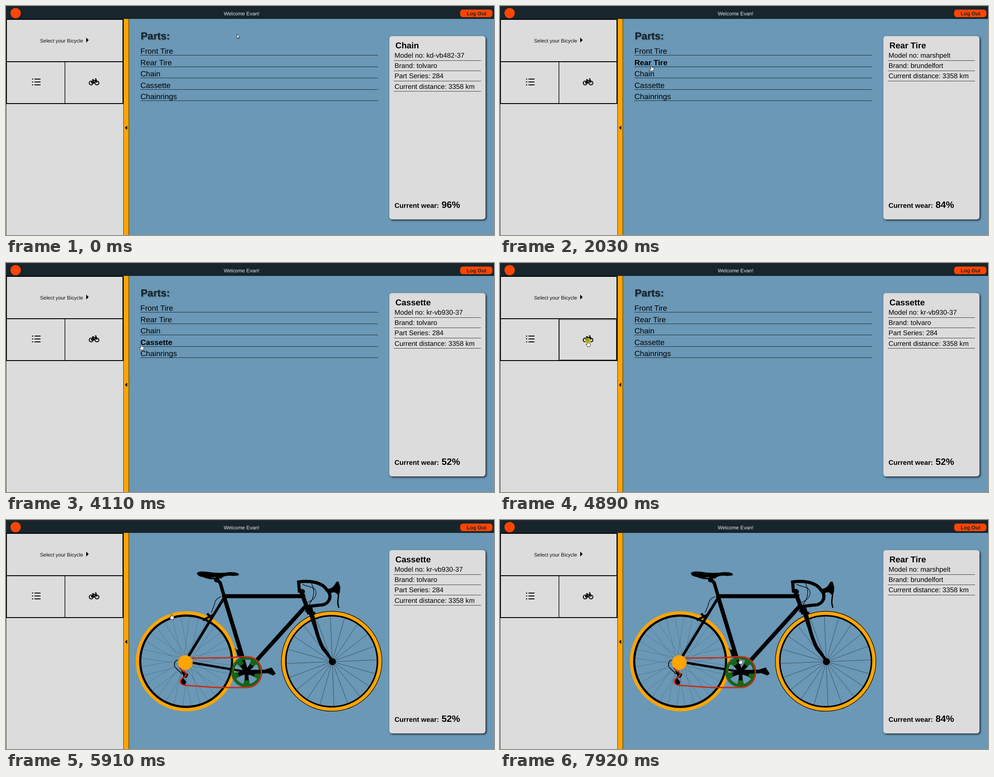
An HTML page for the animation above (8000 ms loop, 1089 by 514 pixels).

```html
<!DOCTYPE html>
<html lang="en">
<head>
<meta charset="utf-8">
<title>Bicycle parts</title>
<style>
  html, body { margin: 0; width: 100%; height: 100%; overflow: hidden; background: #6a98b6; }
  svg { display: block; width: 1089px; height: 514px; font-family: "Liberation Sans", Arial, sans-serif; text-rendering: geometricPrecision; }
  .b { font-weight: bold; }
  .line { fill: none; stroke: #000; }
  .thin { fill: none; stroke: #000; stroke-opacity: .7; }
  .shade { filter: drop-shadow(1px 1px 1px #0007); }
  .card { filter: drop-shadow(2px 2px 2px #000c); }
</style>
</head>
<body>
<svg viewBox="0 0 1089 514">
  <rect width="1089" height="514" fill="#6a98b6"/>

  <g id="list">
    <text class="b shade" x="300.5" y="74.5" font-size="23" fill="#17242c">Parts:</text>
    <g id="rows" font-size="17.07"></g>
  </g>

  <g id="bike">
    <g id="spokes" class="line"></g>
    <g class="line">
      <circle cx="402" cy="317" r="102.8" stroke-width="5.5"/>
      <circle cx="402" cy="317" r="108.6" stroke="#ffa500" stroke-width="7.4"/>
      <circle cx="726.7" cy="317" r="102.4" stroke-width="3.6"/>
      <circle cx="726.7" cy="317" r="108" stroke-width="9.6"/>
      <circle cx="726.7" cy="317" r="107.8" stroke="#ffa500" stroke-width="7.6"/>
    </g>
    <!-- frame -->
    <g class="line">
      <path stroke-width="9" d="M484 171H668M670 192L545 331"/>
      <path stroke-width="9" d="M486 170L527 305"/>
      <path stroke-width="7.5" d="M470 133L478 141L487 172M527 305L537 341"/>
      <path stroke-width="6" d="M487 174L407 306"/>
      <path stroke-width="5" d="M414 320L537 341"/>
      <path stroke-width="9" d="M657 156L677 211"/>
      <path stroke-width="7" d="M655 163L653 139Q672 136 690 140Q709 145 716 157C730 169 722 192 699 191L675 194"/>
      <path stroke-width="3" d="M741 152C746 170 736 180 743 197M441 127Q458 134 473 130Q488 121 507 124"/>
      <path stroke-width="1.2" d="M661 144C676 152 692 148 692 165C690 179 680 180 672 186M681 141C690 158 688 176 676 190M480 172Q467 176 465 190L458 208M434 326L408 319M510 289L521 296"/>
      <path stroke-width="1.6" d="M386 314C374 315 373 329 381 334L393 346"/>
      <path stroke-width="5" d="M439 225L464 212M449 210L459 221M668 204L690 209M676 200L684 214"/>
    </g>
    <path d="M426 119Q430 114 447 116Q475 121 499 117Q520 117 520 123Q518 126 503 125Q488 123 479 132L468 128Q453 131 439 128Q426 126 426 119Z"/>
    <path d="M711 152C723 158 731 151 737 139L742 138L746 151L745 163L740 168Q733 157 721 167Z"/>
    <path d="M670 193L682 190L694 238Q700 264 709 282L731 315L727 319L704 290Q694 270 688 247Z"/>
    <path d="M513 292L526 289L532 309H518Z"/>
    <circle cx="470" cy="134" r="6"/>
    <circle cx="661" cy="161" r="6"/>
    <circle cx="728.5" cy="318" r="7.8"/>
    <path d="M390 338L407 346L404 353L396 355L402 363L400 370L391 368L390 358L396 350Z"/>
    <!-- drivetrain -->
    <circle cx="400" cy="320" r="15.5" fill="#ffa500"/>
    <circle cx="400" cy="320" r="16" fill="none" stroke="#ffa500" stroke-width="2.5" stroke-dasharray="2 1.6"/>
    <g transform="translate(537 341)">
      <circle r="30.5" fill="none" stroke="#15641c" stroke-width="5.5"/>
      <circle r="34" fill="none" stroke="#12451a" stroke-width="2.5" stroke-dasharray="2 1.5"/>
      <g id="spider"></g>
      <circle r="8"/>
      <path d="M0 -4.5L40 -5L56 -10L65 4L59 8L47 3L0 4.5Z"/>
    </g>
    <path fill="none" stroke="#cb2c12" stroke-width="3" d="M414 310L500 309Q528 306 540 307C559 308 570 323 570 342C570 363 555 377 535 376L470 376L399 371C386 369 387 359 395 354C405 349 404 342 394 338L387 332"/>
  </g>

  <!-- header -->
  <rect width="1089" height="29" fill="#18252d"/>
  <rect width="1089" height="1.5" fill="#2b2b2b"/>
  <circle cx="21.5" cy="16" r="11.5" fill="#ff4500"/>
  <text x="486" y="20.5" font-size="11.38" fill="#e3e6e8">Welcome Evan!</text>
  <rect x="1013.5" y="8" width="72" height="17" rx="6" fill="#ff4500"/>
  <text class="b" x="1028" y="20.5" font-size="11.5" fill="#18252d">Log Out</text>

  <!-- sidebar -->
  <rect y="29" width="262" height="485" fill="#dcdcdc"/>
  <rect x="262" y="29" width="12" height="485" fill="#ffa500"/>
  <path class="thin" d="M.5 29V514M262.3 29V514M274 29V514"/>
  <path class="line" stroke-width="2" d="M1 30H261V219H1ZM1 125H261"/>
  <path class="line" stroke-width="1.4" d="M131.5 126V218"/>
  <text x="76" y="81.7" font-size="11.38" fill="#111">Select your Bicycle</text>
  <path d="M179 71L184.5 76.5L179 82Z"/>
  <path class="line" stroke-width="2" d="M63.5 164H77M63.5 170.5H77M63.5 177H77M58 164h2.6M58 170.5h2.6M58 177h2.6"/>
  <g class="line" stroke-width="2">
    <circle cx="190" cy="172.8" r="4.3"/>
    <circle cx="203" cy="172.8" r="4.3"/>
    <path d="M190 172.8L194.5 167H200.5L197 172.8H190M194.5 167L197 172.8M192 165.5h4M198.5 163.5h2.2L203 172.8"/>
  </g>
  <rect id="ring" x="132.5" y="127" width="127" height="90.5" fill="none" stroke="#444"/>
  <path d="M270.5 268.5V278L265.5 273.2Z"/>

  <rect class="card" x="855.5" y="67.5" width="214.5" height="411.5" rx="6" fill="#dcdcdc"/>
  <g id="info"></g>

  <circle id="flash" r="7" fill="#e8e800" opacity=".65"/>
  <g id="cursor" fill="#fff" stroke="#000" stroke-width=".8" stroke-linejoin="round">
    <path id="arrow" d="M.3 0V9.6L2.4 7.6L3.8 10.8L5.3 10.1L4 7.1H7Z"/>
    <path id="hand" d="M-1.2 1.2a1.1 1.1 0 0 1 2.2 0v3.4l3.6.7q1.4.4 1.3 1.8l-.5 3.2-.8 2.6H-.8L-3.8 8.5q-.6-1.5.8-1.4l1.8 1.2z"/>
  </g>
</svg>
<script>
const $ = id => document.getElementById(id);
const LOOP = 8000, STEP = 77;
const show = (id, on) => $(id).setAttribute('visibility', on ? 'visible' : 'hidden');

const names = ['Front Tire', 'Rear Tire', 'Chain', 'Cassette', 'Chainrings'];
$('rows').innerHTML = names.map((name, i) => {
  const y = Math.round(110.2 + 25.5 * i);
  return `<text x="300" y="${y - 3}">${name}</text>
    <path class="thin" d="M300 ${y + .5}H830"/>`;
}).join('');
const labels = $('rows').querySelectorAll('text');

const part = (title, wear, ...rows) => ({ title, wear, rows: [...rows, 'Current distance: 3358 km'] });
const chain = part('Chain', 96, 'Model no: kd-vb482-37', 'Brand: tolvaro', 'Part Series: 284');
const rear = part('Rear Tire', 84, 'Model no: marshpelt', 'Brand: brundelfort');
const cassette = part('Cassette', 52, 'Model no: kr-vb930-37', 'Brand: tolvaro', 'Part Series: 284');
const cards = [[0, chain], [1630, rear], [3030, cassette], [6920, rear]];

function drawCard({ title, wear, rows }) {
  $('info').innerHTML = `<text class="b" x="869" y="95" font-size="18.95">${title}</text>` +
    rows.map((row, i) => `<text x="867" y="${116 + 23.2 * i}" font-size="15.25">${row}</text>
      <path class="thin" d="M865.5 ${122.5 + 23 * i}H1060"/>`).join('') +
    `<text class="b" x="867" y="453" font-size="15.25">Current wear:</text>
     <text class="b" x="972" y="453" font-size="20.6">${wear}%</text>`;
}

// Radial lines; skew swings the inner end away from the centre.
function spokes(cx, cy, count, skew, turn, style) {
  let d = '';
  for (let i = 0; i < count; i++) {
    const a = turn + i * 2 * Math.PI / count, b = a + (i % 2 ? skew : -skew);
    d += `M${cx + 7 * Math.cos(b)} ${cy + 7 * Math.sin(b)}L${cx + 101 * Math.cos(a)} ${cy + 101 * Math.sin(a)}`;
  }
  return `<path d="${d}" ${style}/>`;
}
$('spokes').innerHTML =
  spokes(402, 318, 32, 1.3, .08, 'stroke-width=".8" stroke-opacity=".25"') +
  spokes(728, 318, 20, 0, -.04, 'stroke-width=".8" stroke-opacity=".6"');

$('spider').innerHTML = [0, 1, 2, 3, 4].map(i => `<g transform="rotate(${36 + 72 * i})">
  <path fill="#15641c" d="M-5 -17H5L7.5 -28H-7.5Z"/><path d="M-4 0H4L4.5 -19H-4.5Z"/></g>`).join('');

// Pointer moves: start time, number of steps, destination.
const moves = [
  [160, 3, 504, 70], [470, 9, 339, 135], [1240, 1, 339, 134], [1400, 1, 338, 132],
  [2030, 6, 331, 183], [2580, 1, 330, 184], [3890, 8, 196, 177], [4580, 2, 196, 175],
  [5510, 11, 473, 232], [6370, 2, 472, 229.5], [7550, 3, 541, 307], [7850, 2, 530, 314]
];
const clicks = [[1550, 1630], [2960, 3030], [4890, 4970], [6750, 6920]];
const ease = p => p < .5 ? 4 * p ** 3 : 1 - 4 * (1 - p) ** 3;

function pointer(t) {
  let x = 515, y = 63;
  for (const [start, n, toX, toY] of moves) {
    if (t < start) break;
    const f = ease(Math.min(1, (Math.floor((t - start) / STEP) + 1) / n));
    x += (toX - x) * f;
    y += (toY - y) * f;
  }
  return [x, y];
}

let current;
function draw(t) {
  const [x, y] = pointer(t), riding = t >= 4970;
  const dist = (cx, cy) => Math.hypot(x - cx, y - cy);
  const onTire = cx => Math.abs(dist(cx, 317) - 108) < 6;
  const row = !riding && x >= 300 && x <= 830 ? Math.floor((y - 85) / 25.5) : -1;
  const onButton = x > 131 && x < 261 && y > 126 && y < 218;
  const onPart = riding && (onTire(402) || onTire(727) || dist(537, 341) < 36);
  const hand = onButton || onPart || (x > 261 && x < 275) || (row >= 0 && row < names.length);

  show('list', !riding);
  show('bike', riding);
  show('ring', onButton);
  show('hand', hand);
  show('arrow', !hand);
  show('flash', clicks.some(([from, to]) => t >= from && t < to));
  labels.forEach((label, i) => label.setAttribute('font-weight', i === row ? 'bold' : 'normal'));
  for (const id of ['cursor', 'flash']) $(id).setAttribute('transform', `translate(${x} ${y})`);

  const card = cards.filter(([start]) => t >= start).pop()[1];
  if (card !== current) drawCard(current = card);
}

const begin = performance.now();
function tick() {
  draw((performance.now() - begin) % LOOP);
  requestAnimationFrame(tick);
}
tick();
</script>
</body>
</html>
```
